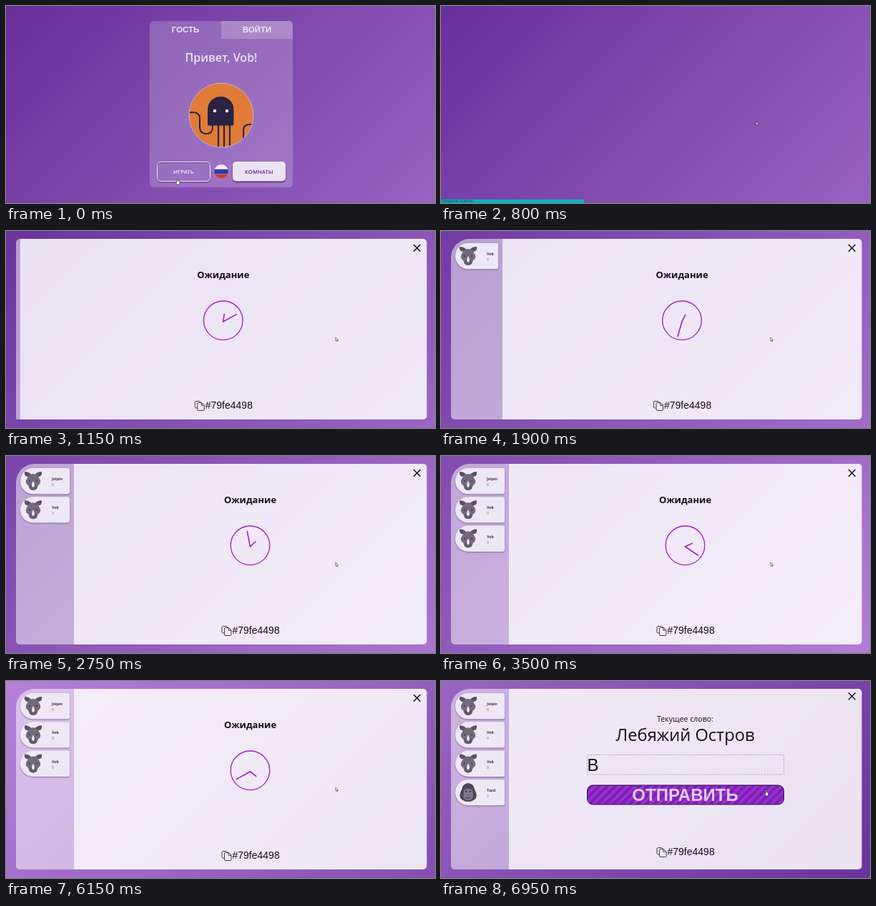
An HTML page with a canvas that plays this animation: 600x276 px, repeating every 7000 ms.

```html
<!DOCTYPE html>
<html lang="ru">
<head>
<meta charset="utf-8">
<title>Ожидание</title>
<style>
html, body { margin: 0; width: 100%; height: 100%; overflow: hidden; background: #67309a; }
canvas { display: block; width: 600px; height: 276px; }
</style>
</head>
<body>
<canvas id="stage"></canvas>
<script>
const W = 600, H = 276, LOOP = 7000;
const LOGIN_END = 800, FADE = 330, GAME = 6500, TYPED = 6850;
const SANS = '"Open Sans", "Noto Sans", sans-serif';
const ARIAL = '"Liberation Sans", Arial, sans-serif';
const INK = '#150c20';

const canvas = document.getElementById('stage');
const ctx = canvas.getContext('2d');
const dpr = window.devicePixelRatio || 1;
canvas.width = W * dpr;
canvas.height = H * dpr;

// Players by join time; "first" puts the newcomer on top
const players = [
  { name: 'Vob', at: 1180 },
  { name: 'Jolpin', at: 2250, first: true },
  { name: 'Vob', at: 2950 },
  { name: 'Tazzi', at: 6350, ape: true }
];
const drift = [[0, 0], [800, 0], [1900, .13], [3500, .33], [4500, .55], [6150, 1], [7000, 1.37]];
const mouseX = [[0, 240], [380, 240], [560, 305], [750, 432], [900, 457], [1000, 457], [1150, 461], [6600, 461], [6750, 455]];
const mouseY = [[0, 242], [380, 242], [560, 220], [750, 166], [900, 154], [1000, 154], [1150, 149], [6600, 149], [6750, 153]];

const clamp = v => Math.max(0, Math.min(1, v));
const smooth = v => v * v * (3 - 2 * v);

function track(points, t) {
  for (let i = 1; i < points.length; i++) {
    const [a, va] = points[i - 1], [b, vb] = points[i];
    if (t <= b) return va + (vb - va) * (t - a) / (b - a);
  }
  return points[points.length - 1][1];
}

function mix(v) {
  const dark = [103, 48, 154], light = [181, 129, 217];
  return 'rgb(' + dark.map((d, i) => Math.round(d + (light[i] - d) * v)) + ')';
}

function text(str, x, y, font, color, align = 'center') {
  ctx.font = font;
  ctx.fillStyle = color;
  ctx.textAlign = align;
  ctx.fillText(str, x, y);
}

function box(x, y, w, h, r, fill, line) {
  ctx.beginPath();
  ctx.roundRect(x, y, w, h, r);
  if (fill) { ctx.fillStyle = fill; ctx.fill(); }
  if (line) { ctx.strokeStyle = line; ctx.lineWidth = 1; ctx.stroke(); }
}

function disc(x, y, r, fill) {
  ctx.beginPath();
  ctx.arc(x, y, r, 0, Math.PI * 2);
  ctx.fillStyle = fill;
  ctx.fill();
}

function shape(d, fill) {
  ctx.fillStyle = fill;
  ctx.fill(new Path2D(d));
}

function line(d, color, width) {
  ctx.strokeStyle = color;
  ctx.lineWidth = width;
  ctx.stroke(new Path2D(d));
}

function withShadow(color, blur, dy, draw) {
  ctx.save();
  ctx.shadowColor = color;
  ctx.shadowBlur = blur * dpr;
  ctx.shadowOffsetY = dy * dpr;
  draw();
  ctx.restore();
}

function background(t) {
  // Triangle wave of two purples, sliding along the 45 degree diagonal
  const start = track(drift, t), span = .62, half = (W + H) / 2;
  const g = ctx.createLinearGradient(0, 0, half, half);
  for (let i = 0; i <= 24; i++) {
    const u = (start + span * i / 24) % 2;
    g.addColorStop(i / 24, mix(1 - Math.abs(1 - u)));
  }
  ctx.fillStyle = g;
  ctx.fillRect(0, 0, W, H);
}

function octopus() {
  const dark = '#2a2342';
  ctx.save();
  disc(301, 153, 45, '#e07b38');
  ctx.clip();
  line('M255 149 H262 Q271 149 271 158 V169 Q271 179 280 179 Q289 179 289 170 V165', dark, 2);
  line('M297 165 V199 M305 165 V199 M313 165 V199', dark, 2.2);
  line('M332 188 V175 Q332 166 340 166 H348', dark, 2);
  box(282, 127, 36.5, 40.5, [18, 18, 2, 2], dark);
  disc(292, 147, 2.3, '#fff');
  disc(309, 147, 2.3, '#fff');
  ctx.restore();
  ctx.beginPath();
  ctx.arc(301, 153, 45, 0, Math.PI * 2);
  ctx.strokeStyle = '#bfb0cf';
  ctx.lineWidth = 1;
  ctx.stroke();
}

function flag() {
  ctx.save();
  disc(301, 232, 10, '#f1edf5');
  ctx.clip();
  ctx.fillStyle = '#2a3dab';
  ctx.fillRect(290, 228.7, 22, 6.7);
  ctx.fillStyle = '#c8403c';
  ctx.fillRect(290, 235.4, 22, 7);
  ctx.restore();
}

function login(t) {
  const fill = smooth(clamp((t - 470) / 150));
  box(201, 21, 200, 233, 5, 'rgba(255,255,255,.2)');
  box(301, 21, 100, 25, [0, 5, 0, 0], 'rgba(255,255,255,.2)');
  text('ГОСТЬ', 251, 37, 'bold 11.4px ' + ARIAL, '#f0e8f6');
  text('ВОЙТИ', 351, 37, 'bold 11.4px ' + ARIAL, '#eee6f5');
  text('Привет, Vob!', 301, 78, '600 16px ' + SANS, '#eae0f2');
  octopus();

  box(211.5, 219.5, 74, 27.5, 5, null, 'rgba(60,20,100,.55)');
  box(211.5, 218.5, 74, 27, 5, `rgba(235,227,243,${fill})`, '#ebe3f3');
  text('ИГРАТЬ', 248.3, 235, '600 7.75px ' + SANS, fill > .5 ? '#5a2a90' : '#f0e8f6');
  flag();
  withShadow('rgba(50,15,90,.8)', 2, 1.5, () => box(317, 218, 74, 27.5, 5, '#ebe3f3'));
  text('КОМНАТЫ', 353.8, 235, '600 7.75px ' + SANS, '#5a2a90');
}

function rhino() {
  const skin = '#73697c', shade = '#5a5163';
  shape('M6 7 Q0 7 1 0 Q8 0 11 5 Z M20 7 Q26 7 25 0 Q18 0 15 5 Z', shade);
  shape('M7 5 Q13 1 19 5 L23 12 Q24 17 20 19 L18 24 Q13 28 8 24 L6 19 Q2 17 3 12 Z', skin);
  shape('M8 19 Q13 16 18 19 L18 24 Q13 28 8 24 Z', '#655b6e');
  shape('M13 13 Q17 20 13 22 Q9 20 13 13 Z', '#eee7f3');
  disc(8, 13, .9, '#332b3d');
  disc(18, 13, .9, '#332b3d');
}

function ape() {
  shape('M13 0 Q21 1 22 9 Q26 16 24 21 Q20 26 13 26 Q6 26 2 21 Q0 16 4 9 Q5 1 13 0 Z', '#4c4554');
  shape('M7 10 Q13 5 19 10 L20 18 Q19 24 13 24 Q7 24 6 18 Z', '#81778a');
  disc(10, 12, 1, '#2b2433');
  disc(16, 12, 1, '#2b2433');
  line('M11 17 H12 M14 17 H15 M9.5 20.5 Q13 22 16.5 20.5', '#3c3445', .9);
}

function playerCard(p, row, width) {
  const y = 17 + row * 40.3;
  withShadow('rgba(60,30,90,.5)', 2, 1, () => box(20, y, width, 36.3, [18, 3, 3, 18], '#eee7f4'));
  ctx.save();
  ctx.translate(25, y + 5);
  (p.ape ? ape : rhino)();
  ctx.restore();
  text(p.name, 64, y + 17, 'bold 5.3px ' + SANS, '#40364a', 'left');
  text('0', 64, y + 25, '5.5px ' + ARIAL, '#7d7387', 'left');
}

function hand(c, len, deg) {
  const a = deg * Math.PI / 180;
  line(`M${c} 127 L${c + Math.sin(a) * len} ${127 - Math.cos(a) * len}`, '#a41bcb', 1.6);
}

function clock(c, t) {
  ctx.beginPath();
  ctx.arc(c, 125.3, 27.3, 0, Math.PI * 2);
  ctx.strokeStyle = '#a91bd0';
  ctx.lineWidth = 1.3;
  ctx.stroke();
  ctx.lineCap = 'round';
  hand(c, 21.5, (t - 812) * .18);
  hand(c, 10.5, (t - 812) * .024);
  ctx.lineCap = 'butt';
}

function roomCode(c, y) {
  const x = c - 39.5;
  line(`M${x + 3} ${y - 1} H${x + 1.5} Q${x} ${y - 1} ${x} ${y - 2.5} V${y - 9} Q${x} ${y - 10.5} ${x + 1.5} ${y - 10.5} H${x + 6.5} L${x + 8.5} ${y - 8.5}`, '#30263a', .9);
  line(`M${x + 3.5} ${y - 7.5} Q${x + 3.5} ${y - 8.5} ${x + 5} ${y - 8.5} H${x + 9.5} L${x + 13} ${y - 5} V${y + 1} Q${x + 13} ${y + 2.5} ${x + 11.5} ${y + 2.5} H${x + 5} Q${x + 3.5} ${y + 2.5} ${x + 3.5} ${y + 1} Z M${x + 9} ${y - 8} V${y - 4.8} H${x + 12.5}`, '#30263a', .9);
  text('#79fe4498', c - 25, y, '14px ' + ARIAL, INK, 'left');
}

function game(c, t) {
  text('Текущее слово:', c, 57, '10.6px ' + SANS, INK);
  text('Лебяжий Остров', c, 84, '23.7px ' + SANS, INK);
  ctx.setLineDash([2.5, 1.5]);
  box(204.5, 103.5, 275, 27.5, 0, null, '#b3a9bd');
  ctx.setLineDash([]);
  if (t >= TYPED) text('В', 204.5, 126, '24px ' + ARIAL, INK, 'left');

  ctx.save();
  box(204.5, 146, 275, 27, 8, '#9a2fd0');
  ctx.clip();
  for (let x = 170; x < 490; x += 11.3) line(`M${x} 176 L${x + 33} 143`, '#7b20b2', 4);
  ctx.restore();
  box(204.5, 146, 275, 27, 8, null, '#2c1244');
  text('ОТПРАВИТЬ', c, 168, 'bold 24px ' + ARIAL, '#ddcce9');
}

function room(t) {
  const list = [];
  for (const p of players) {
    if (t < p.at) continue;
    if (p.first) list.unshift(p); else list.push(p);
  }
  const wide = list.some(p => p.first);
  const cardW = wide ? 69 : 60;
  const edge = list.length ? cardW + 26 : 19.5;
  const c = (edge + 588) / 2;
  const playing = t >= GAME;

  ctx.globalAlpha = smooth(clamp((t - LOGIN_END) / FADE));
  box(14, 11, edge - 14, 253, [26, 0, 0, 5], 'rgba(255,255,255,.51)');
  box(edge, 11, 588.5 - edge, 253, [0, 5, 5, 0], 'rgba(255,255,255,.86)');
  list.forEach((p, i) => playerCard(p, i, cardW));

  const top = playing ? 16.5 : 19;
  line(`M570 ${top} l9.5 9.8 m0 -9.8 l-9.5 9.8`, INK, 1.5);
  if (playing) {
    game(c, t);
  } else {
    text('Ожидание', c, 66, 'bold 13px ' + SANS, INK);
    clock(c, t);
  }
  roomCode(c, playing ? 244 : 249);
  ctx.globalAlpha = 1;

  if (t < 1150) {
    ctx.fillStyle = '#08b3c2';
    ctx.fillRect(0, 271, 200, 5);
    text('Ожидание localhost…', 1, 275.3, '4.6px ' + SANS, '#0b4650', 'left');
  }
}

function cursor(t) {
  const onButton = t < 470 || t >= 6700;
  ctx.save();
  ctx.translate(track(mouseX, t), track(mouseY, t));
  const d = onButton
    ? 'M-.8 .3 Q0 -.5 .7 .3 V3 L2.8 3.6 V6 L2 8 H-.8 L-2.6 5 L-.8 5 Z'
    : 'M0 0 V5.2 L1.2 4.2 L2 5.9 L2.8 5.5 L2.1 3.9 H3.6 Z';
  shape(d, '#fff');
  line(d, '#2a2232', .6);
  ctx.restore();
}

function frame(now) {
  const t = now % LOOP;
  ctx.setTransform(dpr, 0, 0, dpr, 0, 0);
  background(t);
  if (t < LOGIN_END) login(t); else room(t);
  cursor(t);
}

const begin = performance.now();
function tick() {
  frame(performance.now() - begin);
  requestAnimationFrame(tick);
}
tick();
</script>
</body>
</html>
```
